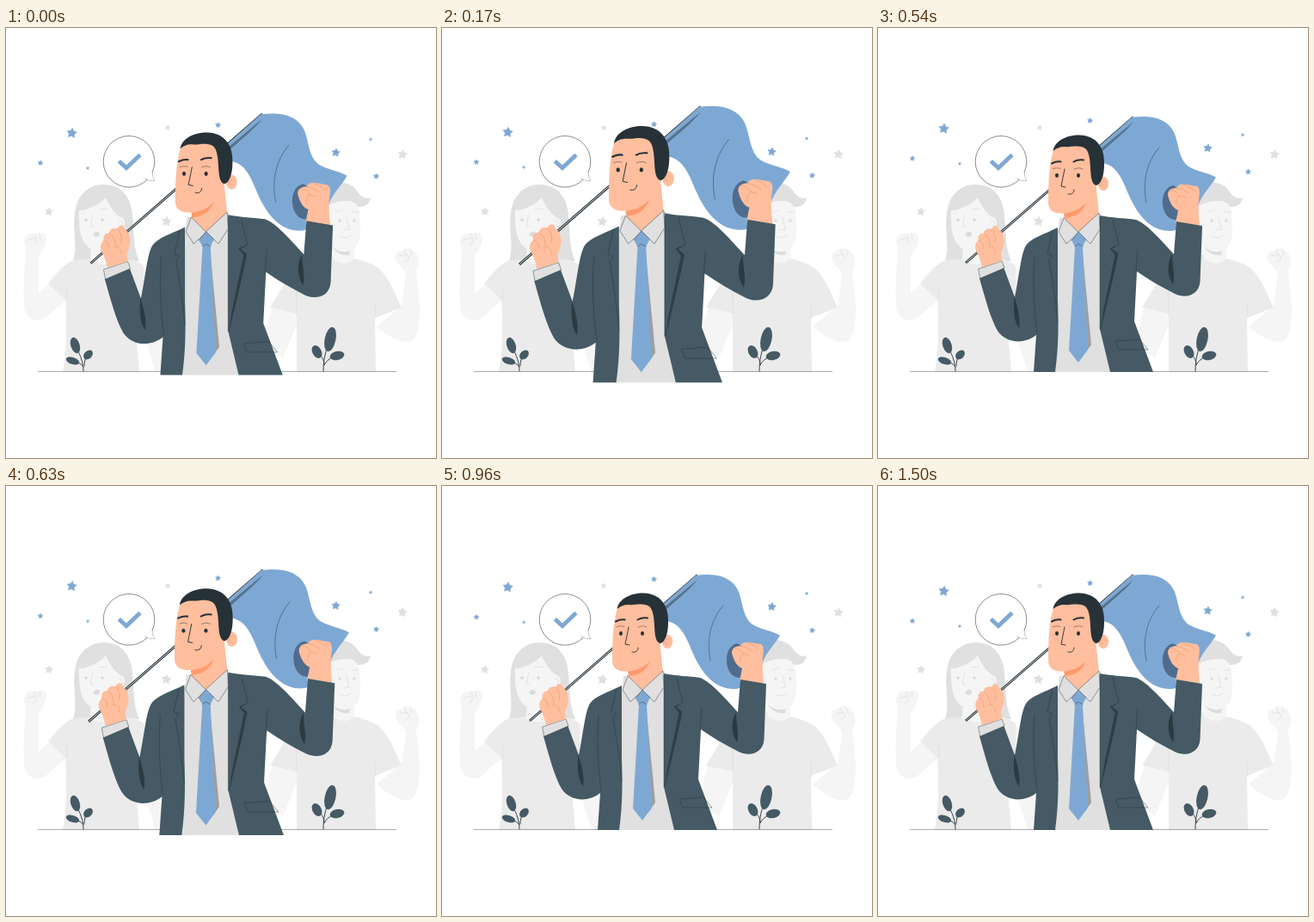
These frames come from a looping animation (500x500 px, 1.54 s). An HTML page:

```html
<!DOCTYPE html>
<html lang="en">
<head>
<meta charset="utf-8">
<title>Victory</title>
<style>
html, body { margin: 0; width: 100%; height: 100%; overflow: hidden; background: #fff; }
svg { display: block; width: 100vw; height: 100vh; }
.blue { fill: #7ea8d4; }
.suit { fill: #455a64; }
.dark { fill: #263238; }
.skin { fill: #ffbe9d; }
.shirt { fill: #e0e0e0; }
.pale { fill: #f5f5f5; }
.tee { fill: #ebebeb; }
.hair { fill: #e0e0e0; }
.ink, .mark, .crease, .faint { fill: none; stroke: #263238; stroke-width: .45; stroke-linecap: round; stroke-linejoin: round; }
.mark { stroke-width: .9; }
.crease { stroke: #eb996f; stroke-width: .6; }
.faint { stroke: #dcdcdc; stroke-width: .7; }
</style>
</head>
<body>
<svg viewBox="0 0 500 500" xmlns="http://www.w3.org/2000/svg">
  <g id="woman">
    <path class="hair" d="M78 271C84 253 77 238 80 216C82 195 95 182 114 182C134 182 146 197 147 218C149 240 148 256 155 271Z"/>
    <path class="pale" d="M70 317C62 322 52 332 45 338C34 344 22 337 21 322C20 300 21 282 23 264L21 247C22 241 27 238 33 239L44 238C48 241 47 247 45 253C43 260 38 262 38 267L38 308C46 303 51 297 56 292Z"/>
    <path class="pale" d="M148 272C166 276 178 300 188 350L190 400H174L152 330Z"/>
    <path class="tee" d="M98 268L76 271C65 277 56 288 49 297L69 316C71 345 71 372 66 400H155L150 345L160 312V276L150 270L128 268Z"/>
    <path class="pale" d="M99 246L98 270C108 277 122 276 130 268L128 240Z"/>
    <path class="pale" d="M85 212C84 232 87 248 96 255C107 263 122 252 126 236C137 238 143 222 133 220C126 215 120 207 116 197C108 206 97 211 85 212Z"/>
    <path class="faint" d="M88 212L95 210M108 211L117 210M101 217L98 230L102 231M24 247L33 244L36 248L32 253M33 239L36 245M39 239L40 246M70 300L71 316M131 224C135 223 137 227 134 231"/>
    <path d="M101 240C104 236 108 236 109 239C109 243 104 245 101 240Z" fill="#dcdcdc"/>
    <circle cx="93" cy="223" r="1.9" fill="#dcdcdc"/><circle cx="112" cy="223" r="1.9" fill="#dcdcdc"/>
  </g>
  <g id="fan">
    <path class="pale" d="M312 320C304 338 302 352 303 372L322 384L340 340V318Z"/>
    <path class="pale" d="M431 347C444 358 458 367 469 365C480 362 481 342 481 322L477 283C482 276 481 264 475 260C469 254 464 256 460 259C452 260 451 267 455 273C459 279 466 282 465 289L460 323Z"/>
    <path class="tee" d="M383 262C356 268 336 277 328 290L307 325L338 332V400H430L429 337L460 325C451 306 444 288 433 279C422 272 412 270 404 268Z"/>
    <path class="pale" d="M378 245L379 267C386 275 400 275 405 268V245Z"/>
    <path class="hair" d="M370 208C368 190 376 179 388 179C399 180 406 185 410 192C415 198 420 199 424 197C423 204 418 208 412 208Z"/>
    <path class="pale" d="M372 207C380 203 394 199 403 202C411 206 412 216 412 228C413 245 410 258 397 260C382 261 374 249 372 234Z"/>
    <path d="M379 254C386 261 394 261 400 259L399 264C390 265 383 261 379 254Z" fill="#dcdcdc"/>
    <path class="faint" d="M384 214L391 212M401 214L410 214M396 220L399 234L393 235M388 242C393 245 398 244 401 241M457 265L466 263L469 268L464 272M463 258L466 264M470 258L472 264M429 320L430 338M338 304V332"/>
    <circle cx="388" cy="224" r="1.7" fill="#dcdcdc"/><circle cx="405" cy="224" r="1.7" fill="#dcdcdc"/>
  </g>
  <path d="M37 399.500H454" stroke="#263238" stroke-width=".4"/>
  <g id="plants">
    <path class="mark" d="M90 399C90 390 87 380 81 371M91 393C91 388 92 384 95 380M90 394C87 390 83 388 78 387M369 399C369 387 371 376 377 362M370 391C370 386 367 381 361 376M370 392C373 386 378 383 385 381"/>
    <g class="suit">
      <ellipse cx="80.500" cy="369" rx="5.200" ry="9.500" transform="rotate(-18 80.500 369)"/>
      <ellipse cx="95.500" cy="380" rx="6.200" ry="4.500" transform="rotate(-45 95.500 380)"/>
      <ellipse cx="77.500" cy="387" rx="8" ry="4" transform="rotate(18 77.500 387)"/>
      <ellipse cx="377" cy="362" rx="6.400" ry="14.400" transform="rotate(12 377 362)"/>
      <ellipse cx="361.500" cy="376.500" rx="5.200" ry="8" transform="rotate(-28 361.500 376.500)"/>
      <ellipse cx="385" cy="381" rx="8.500" ry="5" transform="rotate(-12 385 381)"/>
    </g>
  </g>
  <g id="still"></g>
  <g id="drift"></g>
  <g id="bubble">
    <circle cx="143" cy="155.300" r="29.800" fill="#fff" stroke="#263238" stroke-width=".55"/>
    <path d="M170.500 167C170 171 171 175 173 177.500C169 178 165 177 162 175Z" fill="#fff"/>
    <path class="ink" stroke-dasharray=".5 1.500" d="M170.500 167C170 171 171 175 173 177.500C169 178 165 177 162 175"/>
    <path d="M131.300 154.800L140 162.800L156 147.600" fill="none" stroke="#7ea8d4" stroke-width="4.800"/>
  </g>
  <g id="hero">
    <path d="M102 273L297 103.500" stroke="#263238" stroke-width="2.800"/>
    <path d="M102.500 272.600L297 103.500" stroke="#fff" stroke-width=".8"/>
    <path class="blue" d="M257 138L295 104C318 101 336 105 344 121C350 134 349 152 361 161C371 167 383 168 393 173.500C388 183 380 190 374 202C368 219 354 235 341 236C319 237 303 220 292 195C284 176 278 159 260 157Z"/>
    <path class="dark" opacity=".45" d="M256 143L297 109C288 121 273 132 258 146Z"/>
    <path class="ink" d="M327 139C313 155 307 178 312 203"/>
    <path d="M343 183C334 185 330 195 331 205C332 217 340 226 351 222L357 190Z" fill="#506c8d"/>
    <path class="skin" d="M346 227L349 212C343 210 339 203 337 194C337 188 342 186 347 186C348 182 354 181 359 182L371 184C375 187 374 193 373 199C372 209 373 219 374 230Z"/>
    <path class="crease" d="M347 186C352 187 357 189 361 192M340 189C344 188 349 191 350 195C348 198 346 200 347 204M355 182C360 184 365 186 368 190M350 195L357 197"/>
    <path class="shirt" d="M211 221L203 300L203 400H271L262 300L259 216Z"/>
    <path class="suit" d="M209 232C193 240 178 244 172 253C166 263 164 290 159 313L146 278L118 291C125 316 131 338 139 352C149 367 170 368 184 357L181 400H206C210 372 210 345 209 316Z"/>
    <path class="suit" d="M258 218C272 221 288 221 300 223C311 227 323 240 344 263L347 225L377 230L374.500 295C373 311 358 315 345 309C329 301 314 292 301 283L298 341L320 400H270L258 350Z"/>
    <path class="dark" opacity=".8" d="M158.500 312C157 326 158 342 164 349C166 337 162 324 158.500 312Z"/>
    <path class="dark" opacity=".8" d="M342 263C336 273 336 288 343 298C346 290 342 276 342 263Z"/>
    <path class="dark" opacity=".65" d="M279 252L272 257L279 262C274 291 266 321 259 348C263 320 270 292 275.500 264L270 256.500Z"/>
    <path class="ink" d="M273 223L280 252L271 257L279 263L259 350M203 236L197 262L203 265L199 270C203 295 207 318 209 343M182 266C180 295 181 325 185 354M302 258L300 284M276.500 364L304 362L314 374L280 374ZM258 221V350"/>
    <path class="skin" d="M216 207L217 222L233 238L257 217L253 177Z"/>
    <path d="M216 214C227 214 236 209 242 203C237 216 229 220 217 221Z" fill="#ff9a6c"/>
    <path class="shirt" d="M216 221L210 237L219 251L233 238L247 251L258 234L257 215L233 237Z"/>
    <path class="ink" d="M216 221L210 237L219 251L233 238L247 251L258 234L257 215L233 237Z"/>
    <path d="M237 253L248 368L241 378Z" fill="#9e9e9e"/>
    <path class="blue" d="M233 237L242 246L238 254L244 374L233 389L222 375L229 254L225 247Z"/>
    <path class="ink" d="M229 254L233 251L238 254M225 247L233 237L242 246"/>
    <path class="skin" d="M207 134C199 152 198 178 198 203C198 217 214 217 224 214C238 211 245 201 251 187L250 134Z"/>
    <ellipse class="skin" cx="262" cy="181" rx="6.200" ry="8.300"/>
    <path class="dark" d="M203.500 143C206 131 219 124.500 234 124.500C254 125 264 139 263 159C263 170 260 182 253.500 183C246 180 248 165 246 152C245 145 243 140 238 138.500C229 136 224 139 217 138C211 138 207 140 203.500 143Z"/>
    <path class="crease" d="M258 183C260 177 264 176 265 180M261 185L259 181"/>
    <path d="M202 157.500C206 155.500 209 155 212.500 155.500M227.500 155.500C231 153.500 235 153 239 153.500" fill="none" stroke="#263238" stroke-width="2" stroke-linecap="round"/>
    <path class="ink" d="M203 164C206 162.500 209 162.500 212 163.500M228 164C232 162.500 235 162.500 238 164"/>
    <path class="mark" d="M217 164L213 184L218 185M221 193C225 194 228 192 228 188"/>
    <ellipse class="dark" cx="208" cy="171.500" rx="2" ry="2.400"/>
    <ellipse class="dark" cx="233" cy="171.500" rx="2" ry="2.400"/>
    <path class="shirt" d="M117 280L144 271L147 279L119 291Z"/>
    <path class="ink" d="M117 280L144 271L147 279L119 291Z"/>
    <path class="skin" d="M121 278C119 269 117 264 114 259C112 253 114 249 117 247C115 241 120 238 123 239C123 234 129 232 132 234C134 229 139 229 140 233L145 239C148 247 147 253 143 262L144 271Z"/>
    <path class="crease" d="M117 247C121 248 123 252 123 257M123 239C128 242 130 247 130 253M132 234C136 238 138 243 136 249M129 254C134 254 138 258 136 263"/>
  </g>
</svg>
<script>
const el = id => document.getElementById(id);

function star([x, y, r], fill) {
  let pts = '';
  for (let i = 0; i < 10; i++) {
    const a = i * Math.PI / 5 - 1.45, q = i % 2 ? r * .52 : r;
    pts += `${(x + q * Math.cos(a)).toFixed(2)},${(y + q * Math.sin(a)).toFixed(2)} `;
  }
  return `<polygon points="${pts}" fill="${fill}" stroke="${fill}" stroke-width=".6" stroke-linejoin="round"/>`;
}

const grey = [[188, 116, 3], [461, 147, 5.6], [50, 213.5, 4.8], [186.5, 225, 5.8]];
const blue = [[76.5, 122.3, 6], [40, 157, 3], [95, 163, 1.6], [246.5, 113, 3.2],
  [383.5, 145, 5], [424, 129.5, 1.7], [430.5, 172.5, 3.2]];
el('still').innerHTML = grey.map(s => star(s, '#e0e0e0')).join('');
el('drift').innerHTML = blue.map(s => star(s, '#7ea8d4')).join('');

// Double heartbeat: [part of the beat, scale]
const beat = [[0, 1], [.1, 1.1], [.3, 1], [.4, 1], [.5, 1.1], [.6, 1], [1, 1]];
const LOOP = 1540, STEP = 1000 / 24, BEAT = 1500, LEAD = 36;

function scaleAt(p) {
  const i = Math.max(1, beat.findIndex(b => b[0] >= p));
  const [p0, s0] = beat[i - 1], [p1, s1] = beat[i];
  return s0 + (s1 - s0) * (p - p0) / (p1 - p0);
}

function draw(now) {
  const step = Math.min(36, Math.floor((now % LOOP + 4.9) / STEP));
  const p = Math.min(1, (step * STEP + LEAD) / BEAT);
  const lift = -3 * (1 - Math.cos(2 * Math.PI * p));
  el('hero').setAttribute('transform', `translate(247.5 251.5) scale(${scaleAt(p)}) translate(-247.5 -251.5)`);
  el('drift').setAttribute('transform', `translate(0 ${lift})`);
}

const start = performance.now();
function tick() {
  draw(performance.now() - start);
  requestAnimationFrame(tick);
}
tick();
</script>
</body>
</html>
```
